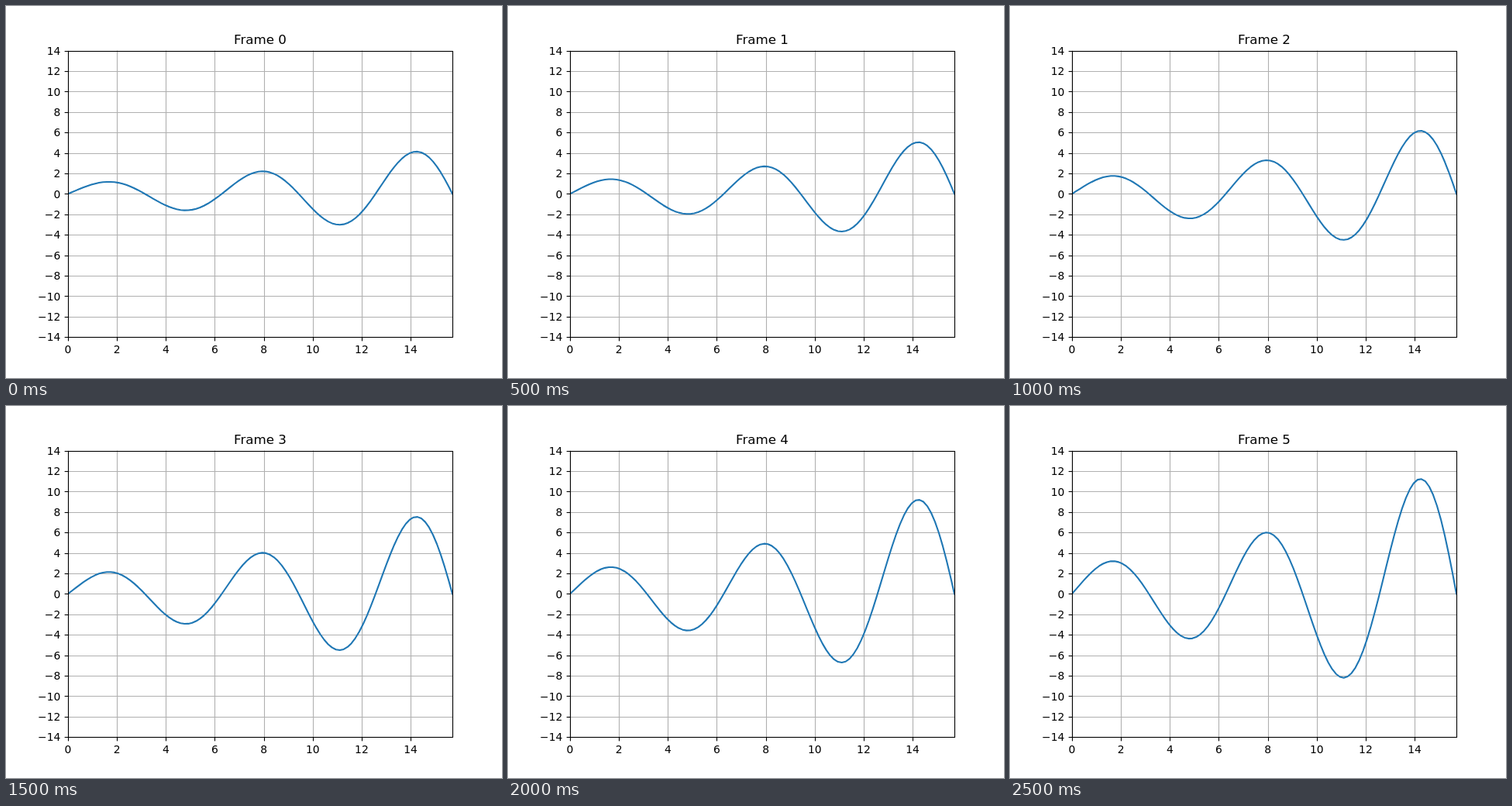
These frames come from a looping animation (640x480 px, 3000 ms). An HTML page with a canvas:

```html
<!DOCTYPE html>
<html lang="en">
<head>
<meta charset="utf-8">
<title>Growing wave</title>
<style>
  html, body { margin: 0; overflow: hidden; background: #fff; }
  canvas { display: block; }
</style>
</head>
<body>
<canvas id="stage" width="640" height="480"></canvas>
<script>
const ctx = document.getElementById("stage").getContext("2d");
const PT = 100 / 72;
const LEFT = 80, RIGHT = 576, TOP = 57.6, BOTTOM = 427.2;
const X_MAX = 5 * Math.PI, Y_MAX = 14, POINTS = 100;
const STEP_MS = 500, STEPS = 6;

const toX = x => LEFT + x / X_MAX * (RIGHT - LEFT);
const toY = y => (TOP + BOTTOM) / 2 - y / Y_MAX * (BOTTOM - TOP) / 2;
const snap = v => Math.round(v) + 0.5;
const range = (from, to, step) =>
  Array.from({ length: (to - from) / step + 1 }, (_, i) => from + i * step);
const xTicks = range(0, 14, 2), yTicks = range(-14, 14, 2);

function line(x1, y1, x2, y2, color) {
  ctx.strokeStyle = color;
  ctx.lineWidth = 0.8 * PT;
  ctx.beginPath();
  ctx.moveTo(x1, y1);
  ctx.lineTo(x2, y2);
  ctx.stroke();
}

function label(text, x, y, align, size = 10) {
  ctx.font = `${size * PT}px "DejaVu Sans", sans-serif`;
  ctx.textAlign = align;
  ctx.fillStyle = "#000";
  ctx.fillText(text, x, y);
}

function drawAxes() {
  const tick = 3.5 * PT, left = snap(LEFT), bottom = snap(BOTTOM);
  for (const v of xTicks) {
    const x = snap(toX(v));
    line(x, TOP, x, BOTTOM, "#b0b0b0");
    line(x, bottom, x, bottom + tick, "#000");
    label(v, toX(v), 448, "center");
  }
  for (const v of yTicks) {
    const y = snap(toY(v));
    line(LEFT, y, RIGHT, y, "#b0b0b0");
    line(left - tick, y, left, y, "#000");
    label(String(v).replace("-", "\u2212"), 70.3, Math.round(toY(v) + 5.2), "right");
  }
}

function drawWave(step) {
  ctx.save();
  ctx.beginPath();
  ctx.rect(LEFT, TOP, RIGHT - LEFT, BOTTOM - TOP);
  ctx.clip();
  ctx.beginPath();
  for (let i = 0; i < POINTS; i++) {
    const x = X_MAX * i / (POINTS - 1);
    ctx.lineTo(toX(x), toY(Math.sin(x) * Math.exp(0.1 * x + 0.2 * step)));
  }
  ctx.strokeStyle = "#1f77b4";
  ctx.lineWidth = 1.5 * PT;
  ctx.lineJoin = "round";
  ctx.lineCap = "square";
  ctx.stroke();
  ctx.restore();
}

function drawBorder() {
  ctx.strokeStyle = "#000";
  ctx.lineWidth = 0.8 * PT;
  const x = snap(LEFT), y = snap(TOP);
  ctx.strokeRect(x, y, snap(RIGHT) - x, snap(BOTTOM) - y);
}

function draw(now) {
  const step = Math.floor(now / STEP_MS) % STEPS;
  ctx.fillStyle = "#fff";
  ctx.fillRect(0, 0, 640, 480);
  drawAxes();
  drawWave(step);
  drawBorder();
  label(`Frame ${step}`, 328, 49, "center", 12);
}

const start = performance.now();
function loop() {
  draw(performance.now() - start);
  requestAnimationFrame(loop);
}
loop();
</script>
</body>
</html>
```
